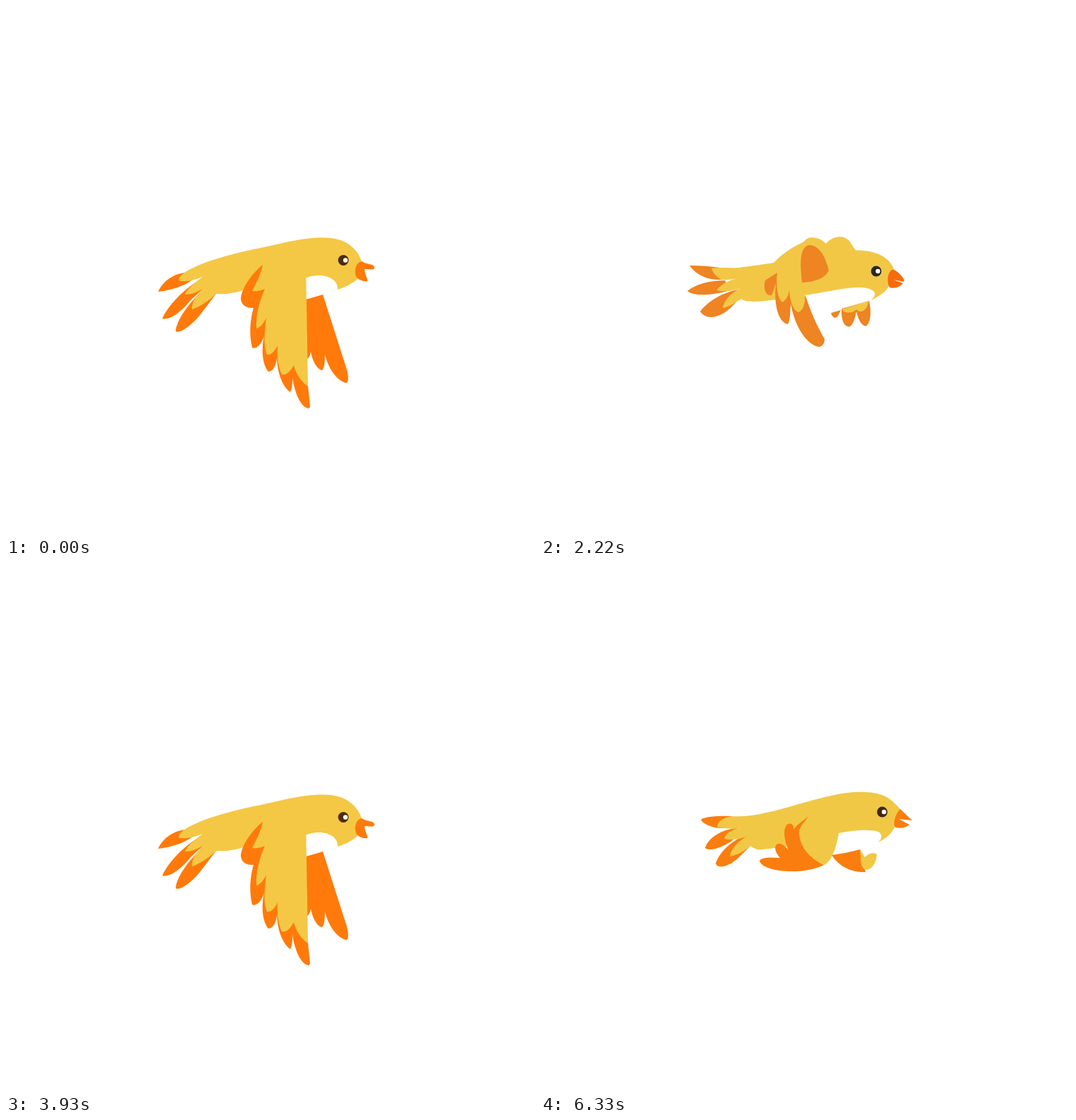
An HTML page with a canvas that plays this animation: 748x748 px, repeating every 6.39 s.

```html
<!DOCTYPE html>
<html lang="en">
<head>
<meta charset="utf-8">
<title>Flying bird</title>
<style>
html, body { margin: 0; width: 100%; height: 100%; overflow: hidden; background: #fff; }
canvas { display: block; width: 748px; height: 748px; }
</style>
</head>
<body>
<canvas id="stage" width="748" height="748"></canvas>
<script>
const ctx = document.getElementById('stage').getContext('2d');
const LOOP = 6390, STEP = 90, CUT = 30;
const SHORT_STEPS = [24, 47];
const MIRROR_Y = 375.5;

const bright = { body: '#f4c845', tip: '#ff7a0a', eye: '#4e2c0c' };
const soft = { body: '#f2c746', tip: '#ee8422', beak: '#f86a0e', eye: '#28271a' };
const warm = { body: '#f1c845', tip: '#fa7d0f', eye: '#43260f' };

const fill = (color, d) => {
  ctx.fillStyle = color;
  ctx.fill(new Path2D(d));
};

const dot = (color, x, y, r) => {
  ctx.fillStyle = color;
  ctx.beginPath();
  ctx.arc(x, y, r, 0, Math.PI * 2);
  ctx.fill();
};

const eye = (color, x, y, shine) => {
  dot(color, x, y, 7.4);
  dot('#fff', x + shine, y, 3.2);
};

const placed = (dx, dy, scaleY, draw) => {
  ctx.save();
  ctx.translate(dx, dy);
  ctx.scale(1, scaleY);
  draw();
  ctx.restore();
};

function farWing(c) {
  fill(c.tip, 'M424 415L448 408L480 508C485 522 485 533 481 533C468 530 455 512 451 492C451 504 450 515 446 515C438 512 433 500 431 489C430 494 428 498 426 499Z');
}

function nearWing(c) {
  fill(c.tip, 'M363 366C350 376 333 398 332 414C333 424 340 427 350 427C346 440 343 462 348 483C354 486 362 478 365 466C361 485 362 506 371 517C378 517 382 507 383 498C384 520 391 538 402 546C405 540 405 532 405 526C409 550 418 568 428 569L430 567L427 537L400 400Z');
  fill(c.body, 'M363 366C361 377 355 390 348 403C355 404 361 402 366 400C357 420 353 440 354 456C360 455 365 447 368 441C365 465 364 480 369 493C375 494 380 488 384 480C383 497 385 511 390 521C397 523 403 515 407 508C410 520 417 531 427 538L424 366Z');
}

function wingsDown() {
  const c = bright;
  farWing(c);
  fill(c.tip, 'M253 377C236 379 221 390 215 404C235 402 255 395 271 382Z');
  fill(c.tip, 'M275 387C252 399 228 425 221 442C233 445 250 430 262 415L282 397Z');
  fill(c.tip, 'M282 400C258 418 240 447 240 460C246 464 265 450 278 432L297 407Z');
  fill(c.body, 'M252 377C290 354 345 346 400 333C430 327 455 325 473 331C492 338 504 354 504 370C504 384 490 394 469 401C470 383 444 376 423 385L400 395L336 402C323 406 310 408 297 407C290 414 277 424 263 429C262 418 271 407 281 398C272 404 263 408 253 408C257 399 266 392 278 383C265 388 253 391 244 388C245 383 248 380 252 377Z');
  nearWing(c);
  fill(c.tip, 'M503 361C510 366 521 364 521 370C521 374 514 372 507 372C507 379 512 386 511 389C506 390 503 388 500 387C495 385 493 379 494 372C495 366 498 362 503 361Z');
  eye(c.eye, 477, 359.5, 3);
}

function softTail(c) {
  fill(c.tip, 'M210 367C225 367 245 368 264 372L256 387C240 388 221 383 210 367Z');
  fill(c.tip, 'M207 403C219 393 240 388 260 388L268 402C247 408 217 412 207 403Z');
  fill(c.tip, 'M225 432C236 417 257 405 279 401L282 411C273 423 262 435 247 439C239 441 231 440 225 432Z');
  fill(c.body, 'M330 363L280 370C265 371 252 369 241 371C243 377 248 383 255 387C264 388 271 386 279 385C268 387 256 392 248 402C260 405 272 402 281 400C270 405 259 415 257 427C268 425 277 418 283 414C290 420 310 418 335 415Z');
}

function softHead(c) {
  fill(c.beak, 'M496 373C502 372 509 380 513 386L513 390L498 387L512 392C508 397 500 400 493 398C489 392 489 378 496 373Z');
  eye(c.eye, 474, 375, 2.4);
}

function wingsRising() {
  const c = soft;
  softTail(c);
  fill(c.tip, 'M333 377C325 376 317 384 316 392C315 403 319 410 326 409C329 404 330 396 332 392C329 421 335 447 349 450C353 443 352 432 353 424L365 380Z');
  fill(c.tip, 'M353 420C357 446 372 478 393 482C399 481 401 476 401 471C389 450 380 430 373 405Z');
  fill(c.tip, 'M410 434C412 441 417 443 420 438L424 430Z');
  fill(c.tip, 'M425 428C424 445 429 454 436 453.5C442 451 444 440 446 432C449 445 454 453 460 452.5C467 447 467 430 464 417Z');
  fill(c.body, 'M425 429C430 435 440 435 446 429C452 436 462 430 463 417Z');
  fill(c.body, 'M317 388L329 363C343 348 358 340 372 333C378 323 395 327 403 336C412 325 431 321 439 337L445 345.5C472 345 493 354 500 374L491 398C486 405 478 410 469 415L373 409C374 418 372 430 364 433C356 430 352 417 351 402C350 409 347 416 341 419C334 412 332 395 334 377Z');
  fill('#fff', 'M373 409C400 405 425 399 447 398C464 397 474 403 472 409C470 415 463 417 456 418C439 421 420 430 410 434L400 455Z');
  fill(c.tip, 'M369 391C367 370 364 341 379 338C395 338 403 358 407 374C402 385 388 390 369 391Z');
  softHead(c);
}

function wingsUp() {
  const c = soft;
  placed(0, MIRROR_Y * 2, -1, () => farWing(c));
  placed(-8, 0, 1, () => softTail(c));
  fill(c.body, 'M300 368C345 360 385 343 440 345C472 345 493 354 500 374L491 398C486 405 478 410 471 414C473 402 464 397 447 398C425 399 400 405 373 409C350 414 325 416 300 418Z');
  placed(0, MIRROR_Y * 2, -1, () => nearWing(c));
  softHead(c);
}

function wingsFolding() {
  const c = warm;
  fill(c.tip, 'M270 358C255 357 230 358 226 363C230 370 245 376 262 375L278 367Z');
  fill(c.tip, 'M276 375C258 376 236 388 232 403C238 408 257 403 272 391L287 378Z');
  fill(c.tip, 'M292 385C273 389 252 408 247 425C250 433 265 430 280 416L298 398Z');
  fill(c.body, 'M270 358C310 361 360 340 410 329C440 322 470 322 487 330C498 336 504 344 509 349L500 374C495 383 488 390 476 395C483 390 483 384 477 380C465 376 440 378 421 382C418 400 412 422 400 427C380 422 360 414 348 401L313 405C306 406 301 404 296 400C288 407 278 413 267 415C269 402 280 393 293 385C283 391 270 392 259 390C262 379 274 376 287 374C274 377 260 376 249 373C250 365 258 360 270 358Z');
  fill(c.tip, 'M378 358C370 365 362 370 357 377C358 371 355 367 349 369C342 374 343 390 350 406C345 400 340 396 335 397C329 399 330 408 338 417C325 416 312 416 309 421C311 431 335 437 362 436C378 435 392 431 400 427C380 418 364 400 365 378C368 370 373 366 378 358Z');
  fill(c.tip, 'M411 413C425 411 440 408 451 405L459 437C440 438 422 430 411 413Z');
  fill(c.body, 'M451 405C455 411 457 414 458 416C462 411 470 408 475 412C474 424 468 434 459 434C450 430 453 416 451 405Z');
  fill(c.tip, 'M508 348L525 364L506 362L521 370C515 375 506 376 500 373C498 365 502 353 508 348Z');
  eye(c.eye, 482.5, 352, 2.5);
}

const poses = [wingsDown, wingsRising, wingsUp, wingsFolding];

function stepAt(time) {
  for (const i of SHORT_STEPS) {
    if (time >= (i + 1) * STEP - CUT) time += CUT;
    else break;
  }
  return Math.floor(time / STEP);
}

function draw(now) {
  ctx.fillStyle = '#fff';
  ctx.fillRect(0, 0, 748, 748);
  poses[stepAt(now % LOOP) % poses.length]();
}

const start = performance.now();
function tick() {
  draw(performance.now() - start);
  requestAnimationFrame(tick);
}
tick();
</script>
</body>
</html>
```
